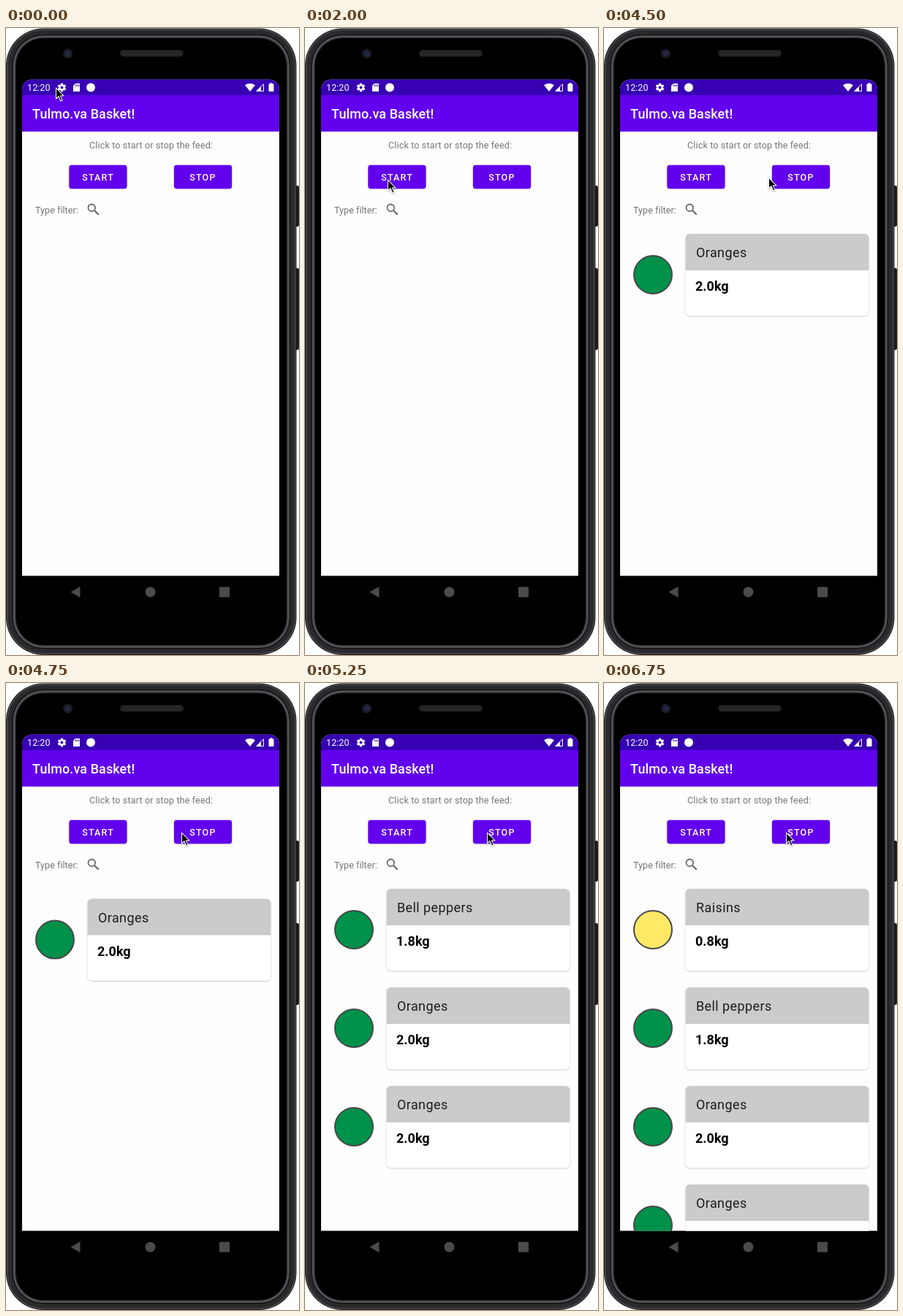
An HTML page with a canvas that plays this animation: 401 px wide and 859 px high, repeating every 8 s.

```html
<!DOCTYPE html>
<html lang="en">
<head>
<meta charset="utf-8">
<title>Produce feed</title>
<style>
html, body { margin: 0; width: 100%; height: 100%; overflow: hidden; background: #fff; }
canvas { display: block; width: 401px; height: 859px; }
</style>
</head>
<body>
<canvas id="stage" width="401" height="859"></canvas>
<script>
const ctx = document.getElementById('stage').getContext('2d');
const LOOP = 8000, STEP = 250;
const MOVE = 250, FADE = 120;
const TOP = 282, ROW = 135;
const PURPLE = '#6200ee', GREEN = '#00914b', YELLOW = '#ffe967';
const SCREEN = { x: 22, y: 70.4, w: 352, h: 680.3 };

// Oldest first; newer items push the older ones down.
const items = [
  { name: 'Oranges', kg: '2.0kg', color: GREEN, at: 3380 },
  { name: 'Oranges', kg: '2.0kg', color: GREEN, at: 4714 },
  { name: 'Bell peppers', kg: '1.8kg', color: GREEN, at: 4714 },
  { name: 'Raisins', kg: '0.8kg', color: YELLOW, at: 6315 }
];

// Pointer stops: time, x, y
const stops = [
  [0, 68, 82], [250, 120, 206], [500, 122, 207], [1250, 122, 206],
  [1750, 113, 208], [4250, 150, 206], [4500, 225, 205],
  [4750, 240, 205], [5000, 249, 205]
];

const clamp = v => Math.min(1, Math.max(0, v));
const ease = v => (1 - Math.cos(Math.PI * clamp(v))) / 2;

function paint(fill, stroke, line) {
  if (fill) { ctx.fillStyle = fill; ctx.fill(); }
  if (stroke) { ctx.strokeStyle = stroke; ctx.lineWidth = line; ctx.stroke(); }
}

function rect(x, y, w, h, r, fill, stroke, line = 1) {
  ctx.beginPath();
  ctx.roundRect(x, y, w, h, r);
  paint(fill, stroke, line);
}

function disc(x, y, r, fill, stroke, line = 1) {
  ctx.beginPath();
  ctx.arc(x, y, r, 0, Math.PI * 2);
  paint(fill, stroke, line);
}

function poly(fill, ...pts) {
  ctx.beginPath();
  for (let i = 0; i < pts.length; i += 2) ctx.lineTo(pts[i], pts[i + 1]);
  ctx.closePath();
  paint(fill);
}

function text(str, x, y, size, weight, color, spacing = 0) {
  ctx.font = `${weight} ${size}px Roboto, sans-serif`;
  ctx.letterSpacing = spacing + 'px';
  ctx.fillStyle = color;
  ctx.fillText(str, x, y);
}

function shadow(alpha, blur, drop) {
  ctx.shadowColor = `rgba(0,0,0,${alpha})`;
  ctx.shadowBlur = blur;
  ctx.shadowOffsetY = drop;
}

// One ring of the phone body, inset from its outer edge.
function shell(inset, color) {
  rect(inset, inset + 0.5, 397.5 - 2 * inset, 858.5 - 2 * inset, 51 - inset, color);
}

function drawPhone() {
  ctx.fillStyle = '#fff';
  ctx.fillRect(0, 0, 401, 859);
  rect(394, 216, 7, 56, 2, '#1d1d20');
  rect(394, 329, 7, 112, 2, '#1d1d20');
  shell(0, '#17171a');
  shell(1, '#4a4b4f');
  shell(2.5, '#2a2a2d');
  shell(8, '#1a1a1c');
  shell(10, '#55565b');
  shell(12.5, '#1c1c1e');
  shell(14, '#000');
  disc(84.5, 35, 6.5, '#1c1c22');
  disc(84.5, 35, 3.5, '#23284a');
  rect(156.5, 30.5, 86, 8.5, 4, '#262626', '#191919');
  poly('#4b4b4b', 88.5, 772.7, 101.5, 765.2, 101.5, 780.2);
  disc(197.5, 772.7, 7, '#4b4b4b');
  rect(292, 765.7, 14, 14, 1, '#4b4b4b');
}

function drawGear(x, y) {
  ctx.fillStyle = '#fff';
  for (let i = 0; i < 3; i++) {
    ctx.save();
    ctx.translate(x, y);
    ctx.rotate(i * Math.PI / 3);
    ctx.fillRect(-1.6, -5.8, 3.2, 11.6);
    ctx.restore();
  }
  disc(x, y, 3.2, null, '#fff', 2.4);
  disc(x, y, 1.9, '#3700b3');
}

function drawStatus() {
  ctx.fillStyle = '#3700b3';
  ctx.fillRect(22, 70, 352, 22);
  text('12:20', 29, 86, 12.6, 400, '#fff', 0.05);
  drawGear(76.5, 81.5);
  poly('#fff', 95, 76, 101, 76, 101, 87, 92, 87, 92, 79);
  ctx.fillStyle = '#3700b3';
  for (const x of [95, 97, 99]) ctx.fillRect(x, 77.5, 1, 2.5);
  disc(116, 81.5, 6, '#fff');

  ctx.beginPath();
  ctx.moveTo(334, 87);
  ctx.lineTo(327, 78.3);
  ctx.quadraticCurveTo(334, 73.5, 341, 78.3);
  ctx.closePath();
  paint('#fff');
  ctx.beginPath();
  ctx.moveTo(342.8, 86.5);
  ctx.lineTo(352.5, 76.8);
  ctx.lineTo(352.5, 86.5);
  ctx.closePath();
  paint(null, '#fff', 1);
  poly('#fff', 342.8, 86.5, 349, 80.3, 349, 86.5);
  rect(359.5, 76.5, 7, 10.5, 1, '#fff');
  ctx.fillRect(361.5, 75.3, 3, 2);
}

function drawButton(label, x, textX, pressed) {
  ctx.save();
  shadow(0.16, pressed ? 5 : 2, pressed ? 1.5 : 0.5);
  rect(x, 187.8, 79.3, 32.4, 3.6, PURPLE);
  ctx.restore();
  if (pressed) rect(x, 187.8, 79.3, 32.4, 3.6, 'rgba(255,255,255,.15)');
  text(label, textX, 209, 12.57, 500, '#fff', 1.12);
}

function drawCard(item, y) {
  disc(67, y + 56, 26, item.color, '#474747', 2);
  ctx.save();
  shadow(0.22, 2, 0.8);
  rect(111.5, y, 251, 112.5, 6, '#fff');
  ctx.restore();
  rect(111.5, y, 251, 50, [6, 6, 0, 0], '#cbcbcb');
  text(item.name, 126, y + 32, 18, 400, '#1c1c1c', 0.4);
  text(item.kg, 125, y + 78.3, 18, 700, '#000');
}

function drawList(t) {
  items.forEach((item, i) => {
    const alpha = clamp((t - item.at - MOVE) / FADE);
    if (!alpha) return;
    const rows = items.slice(i + 1).reduce((n, next) => n + ease((t - next.at) / MOVE), 0);
    ctx.globalAlpha = alpha;
    drawCard(item, TOP + ROW * rows);
    ctx.globalAlpha = 1;
  });
}

function drawScreen(t) {
  const { x, y, w, h } = SCREEN;
  ctx.save();
  ctx.beginPath();
  ctx.roundRect(x, y, w, h, [14, 14, 0, 0]);
  ctx.clip();
  ctx.fillStyle = '#fefefe';
  ctx.fillRect(x, y, w, h);
  drawList(t);
  ctx.save();
  shadow(0.15, 2, 0.5);
  ctx.fillStyle = PURPLE;
  ctx.fillRect(x, 91, w, 50.8);
  ctx.restore();
  drawStatus();
  text('Tulmo.va Basket!', 36, 124, 18, 500, '#fff', 0.08);
  text('Click to start or stop the feed:', 114, 165, 12.57, 400, '#757575', 0.14);
  drawButton('START', 86.3, 104.3, t === 1750);
  drawButton('STOP', 229.9, 251.3, t === 5000);
  text('Type filter:', 40, 254, 12.57, 400, '#757575', 0.03);
  disc(117.3, 246.3, 4.8, null, '#686868', 1.8);
  ctx.beginPath();
  ctx.moveTo(120.8, 249.8);
  ctx.lineTo(126.8, 255.8);
  paint(null, '#686868', 2.2);
  ctx.restore();
}

function drawPointer(t) {
  const [, x, y] = stops.filter(s => s[0] <= t).pop();
  ctx.save();
  ctx.translate(x, y);
  shadow(0.35, 2, 1);
  poly('#fff', 0, -1, 0, 16, 3.8, 12.7, 6.6, 18.8, 9.8, 17.4, 7.2, 11.5, 12, 11.3);
  ctx.shadowColor = 'transparent';
  poly('#000', 1, 1.6, 1, 13.6, 4.1, 10.8, 7.1, 17.3, 8.5, 16.7, 5.7, 10.4, 9.7, 10.3);
  ctx.restore();
}

function frame() {
  const t = Math.floor(performance.now() % LOOP / STEP) * STEP;
  drawPhone();
  drawScreen(t);
  drawPointer(t);
  requestAnimationFrame(frame);
}
frame();
</script>
</body>
</html>
```
